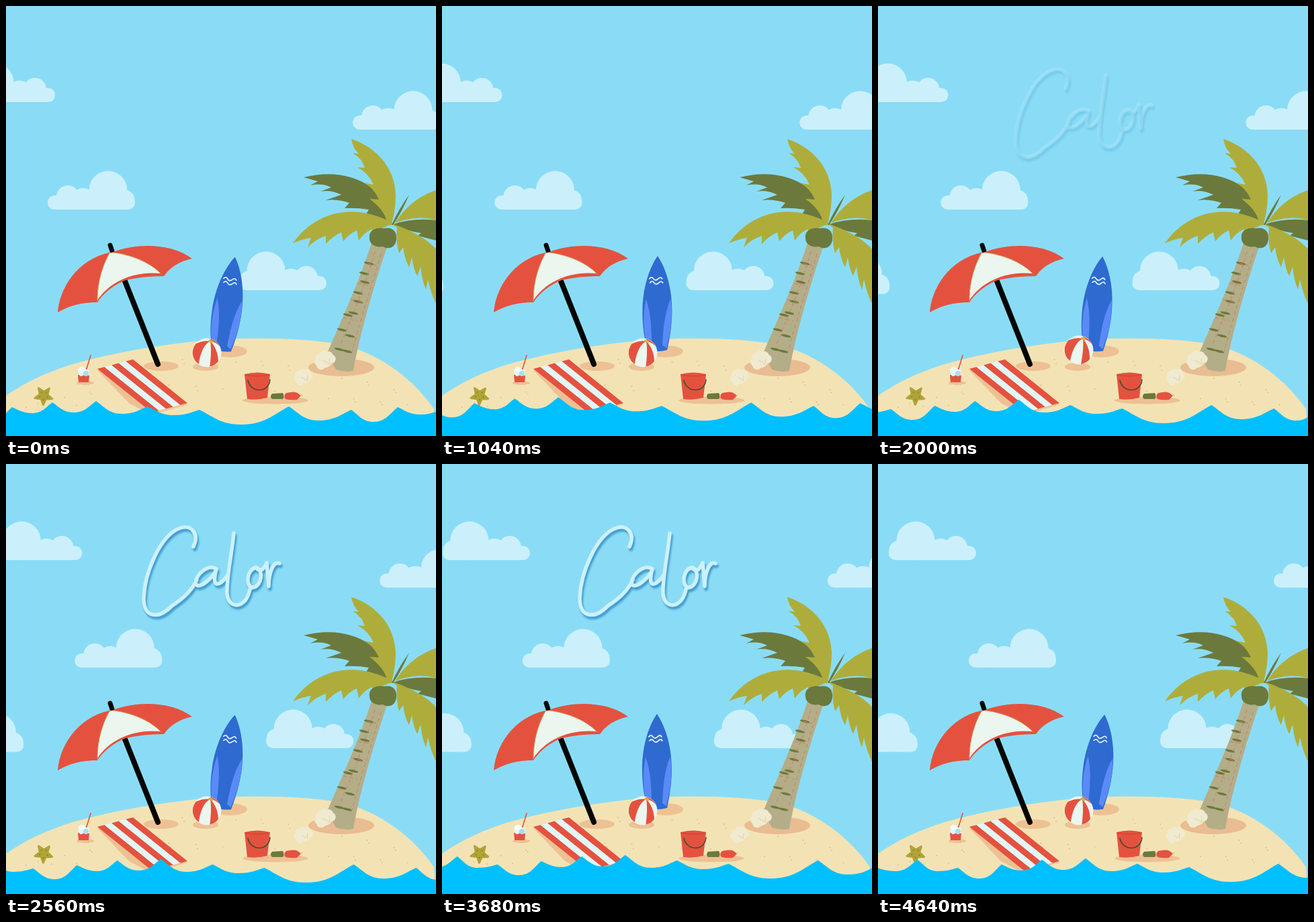
These frames come from a looping animation (640 by 640 pixels, 4.72 s). An HTML page with a canvas:

```html
<!DOCTYPE html>
<html lang="es">
<head>
<meta charset="utf-8">
<title>Calor</title>
<style>
html, body { margin: 0; width: 100%; height: 100%; overflow: hidden; background: #8adcf6; }
canvas { display: block; width: 640px; height: 640px; }
</style>
</head>
<body>
<canvas id="stage" width="640" height="640" role="img" aria-label="Calor"></canvas>
<script>
const ctx = document.getElementById('stage').getContext('2d');
const LOOP = 4720, STEP = 40, SWAY = 2500;
const C = {
  sky: '#8adcf6', cloud: '#cbf0fb', sea: '#00bfff', sand: '#f3e3b4', shade: '#edc194',
  red: '#e4523f', white: '#e2f6f8', cream: '#eaf6ee', leaf: '#aead3b', dark: '#6b7a3c', trunk: '#b3ae88',
  board: '#2f6ad0', stripe: '#5a8af8', shell: '#efead0', black: '#050505'
};

function fill(color, d) {
  ctx.fillStyle = color;
  ctx.fill(new Path2D(d));
}
function line(color, width, d) {
  ctx.strokeStyle = color;
  ctx.lineWidth = width;
  ctx.stroke(new Path2D(d));
}
function oval(color, x, y, rx, ry = rx, turn = 0) {
  ctx.fillStyle = color;
  ctx.beginPath();
  ctx.ellipse(x, y, rx, ry, turn, 0, 7);
  ctx.fill();
}
function at(x, y, turn, draw) {
  ctx.save();
  ctx.translate(x, y);
  ctx.rotate(turn);
  draw();
  ctx.restore();
}
const clamp = v => Math.max(0, Math.min(1, v));

function cloud(x, y, flip) {
  ctx.save();
  ctx.translate(flip ? x + 130 : x, y);
  if (flip) ctx.scale(-1, 1);
  ctx.fillStyle = C.cloud;
  ctx.beginPath();
  ctx.roundRect(0, -21, 130, 21, 10);
  ctx.fill();
  oval(C.cloud, 30, -19, 17);
  oval(C.cloud, 53, -19, 16, 13);
  oval(C.cloud, 90, -29, 28.5);
  oval(C.cloud, 115, -14.5, 14.5);
  ctx.restore();
}

function clouds(t) {
  const x = t * 0.01573;
  cloud(62 + x, 303);
  cloud(516 + x, 184);
  cloud(-144 + x, 428.5);
  cloud(-57 + x, 143, true);
  cloud(347 + x, 423, true);
}

function island() {
  fill(C.sand, 'M0 580C30 559 62 545 96 534C160 515 270 496 350 495C410 494 460 497 500 504C560 518 610 560 637 600L640 640H0Z');
  for (let i = 0; i < 46; i++) {
    const x = 30 + (i * 137.5) % 570;
    const top = 512 + Math.pow(Math.abs(x - 350) / 300, 2) * 75;
    oval('#e9b995', x, top + (i * 0.618 % 1) * (596 - top), 1);
  }
  oval(C.shade, 231, 536, 26, 7);
  oval(C.shade, 333, 514, 26, 9);
  oval(C.shade, 297, 537, 19, 6);
  oval('#e9bc91', 499, 538, 49, 13);
  oval(C.shade, 401, 587, 49, 5.5);
  oval(C.shade, 118, 561, 13, 3);
}

function palm() {
  fill(C.trunk, 'M545 350L568 356C553 400 528 480 517 543Q505 546 491 541L478 517C500 465 526 410 545 350Z');
  const rings = [[540, 383], [533, 398], [534, 411], [524, 427], [524, 440], [509, 460], [517, 457], [500, 482], [512, 491], [496, 511], [508, 514]];
  for (const [x, y] of rings) oval(C.dark, x, y, 7.5, 1.9, 0.24);
  ctx.setLineDash([5, 5]);
  line('#d4776f', 1, 'M549 366C536 412 514 465 497 506M558 369C544 420 526 470 515 515M538 383L551 386M525 413L541 416M514 437L532 442M502 464L523 469');
  ctx.setLineDash([]);

  fill(C.leaf, 'M579 323C594 300 612 284 640 274V319C620 313 600 315 579 323Z');
  fill(C.dark, 'M576 325Q606 315 640 319V349Q625 345 613 342L618 338Q596 335 576 325Z');
  fill(C.leaf, 'M572 323C605 334 634 350 646 370V453Q634 436 628 407L625 422Q619 408 617 388L612 402Q606 390 604 374L600 389Q593 376 591 359L585 368Q580 350 582 330Z');
  fill(C.dark, 'M443 255C482 245 516 251 541 268C557 282 566 302 573 324Q554 313 533 315L540 303Q522 300 504 301L511 293Q494 287 476 289L499 281Q484 273 468 276L484 270Q470 263 453 267L464 261Q454 258 443 255Z');
  fill(C.leaf, 'M514 198C556 212 579 245 580 281Q580 304 573 327L567 322Q564 304 541 287L555 288Q548 271 532 263L547 266Q540 249 523 240L534 241Q530 227 516 219L525 220Q516 211 514 198Z');
  fill(C.leaf, 'M427 353C455 313 510 287 578 324Q560 328 545 342L545 332Q533 337 525 349L522 334Q511 339 502 350L499 337Q487 342 476 354L476 342Q461 347 449 359L454 345Q441 347 427 353Z');
  fill(C.dark, 'M574 326Q584 303 600 281Q589 307 576 326Z');
  fill(C.dark, 'M541 346C539 332 554 329 563 331C575 329 582 335 581 347C580 360 569 363 561 358C549 360 541 354 541 346Z');
}

function surfboard(turn) {
  at(320, 513, turn, () => {
    fill(C.board, 'M0 -141C13 -122 22 -92 22 -59C22 -35 18 -14 15 -1Q0 3 -13 -1C-19 -16 -22 -35 -22 -59C-22 -92 -13 -122 0 -141Z');
    fill(C.stripe, 'M-17 -77C-9 -56 -8 -29 -8 -1L-13 -2C-21 -25 -22 -52 -17 -77Z');
    fill(C.stripe, 'M20 -78C10 -55 9 -28 8 -8L14 -4C20 -28 24 -49 20 -78Z');
    const ripple = 'q3 -4 6 0t7 0t6 0';
    line('#d9f1ff', 1.8, 'M-12 -107' + ripple + 'M-11 -101' + ripple);
  });
}

function ball(t) {
  const phase = (t % (SWAY / 2) - 250) / 540;
  const hop = phase > 0 && phase < 1 ? Math.sin(Math.PI * phase) : 0;
  at(299, 516 - 17.5 * hop, hop * 0.25, () => {
    oval(C.cream, 0, 0, 21.5);
    ctx.save();
    ctx.beginPath();
    ctx.arc(0, 0, 21.2, 0, 7);
    ctx.clip();
    fill(C.red, 'M5 -17C-3 -14 -10 0 -12 17L-24 8V-10L-15 -14Q-5 -19 5 -17Z');
    fill(C.red, 'M5 -17C7 -6 6 8 4 24L17 15Q17 -5 5 -17Z');
    fill(C.red, 'M5 -17Q16 -16 24 -3V-20H5Z');
    ctx.restore();
    oval('#d5b448', 6, -17, 4, 2, 0.4);
  });
}

function umbrella() {
  line(C.black, 8, 'M176 407L226 533');
  line(C.black, 7, 'M155 356L158 365');
  fill(C.red, 'M160 366C198 352 247 354 277 376Q249 382 235 402Q204 402 178 408Q151 419 136 441Q102 441 77 456C81 410 116 372 160 366Z');
  fill(C.cream, 'M160 367C190 371 216 383 230 398C188 394 154 411 136 438C136 408 145 384 154 368Z');
  line('#cf9f4b', 0.8, 'M154 368C145 384 136 408 136 439M160 367C190 371 216 383 231 399');
}

function towel() {
  const stripe = (a, b, color) => {
    const x = k => 136 + 53 * k, y = k => 540 - 14 * k;
    fill(color, `M${x(a)} ${y(a)}L${x(b)} ${y(b)}l81 65L${x(a) + 81} ${y(a) + 65}Z`);
  };
  fill(C.shade, 'M136 542L189 528L270 593L216 609L183 591Z');
  for (let i = 0; i < 5; i++) stripe(i / 5, (i + 1) / 5, i % 2 ? C.white : C.red);
}

function drink() {
  line(C.red, 1.6, 'M119 543L126 520');
  fill(C.white, 'M107 541H124L123 560H108Z');
  fill(C.red, 'M107 549L124 550L123 560H108Z');
  oval('#f4fdff', 113, 541, 5, 4);
  oval('#a9dff0', 119, 547, 4, 4);
  oval(C.white, 112, 548, 3, 3);
}

function bucket() {
  fill(C.red, 'M355 548Q374 543 393 548L389 583Q374 587 359 585Z');
  line('#c9412f', 1, 'M356 549Q374 553 392 549');
  line('#405030', 1.6, 'M360 557C364 576 391 577 393 556');
  fill(C.dark, 'M396 577L412 576Q415 581 412 585H396Q392 581 396 577Z');
  fill(C.red, 'M417 576Q430 573 434 576L439 580L433 586Q423 587 416 585Q412 580 417 576Z');
}

function shell(x, y, size) {
  at(x, y, -0.25, () => {
    for (let i = 0; i < 6; i++) {
      const a = 2.5 + i * 0.75;
      oval(C.shell, Math.cos(a) * size * 0.58, Math.sin(a) * size * 0.5, size * 0.43);
    }
    oval(C.shell, 0, 0, size * 0.65);
    line('#e4d3a6', 1, `M${size * 0.3} ${size * 0.4}L${-size * 0.2} ${-size * 0.1}M${size * 0.3} ${size * 0.4}L${size * 0.45} ${-size * 0.1}`);
  });
}

function starfish() {
  const tilt = -0.9;
  ctx.fillStyle = ctx.strokeStyle = '#b0a337';
  ctx.lineWidth = 3;
  ctx.beginPath();
  for (let i = 0; i < 10; i++) {
    const a = i * Math.PI / 5 + tilt, r = i % 2 ? 6 : 13.5;
    ctx.lineTo(56 + r * Math.cos(a), 580 + r * Math.sin(a));
  }
  ctx.closePath();
  ctx.fill();
  ctx.stroke();
  for (let i = 0; i < 5; i++) {
    const a = i * Math.PI * 0.4 + tilt;
    oval('#857d2c', 56 + 6 * Math.cos(a), 580 + 6 * Math.sin(a), 1);
  }
}

// Crest x, y, followed by the trough to its right.
const swells = [
  [-182, 597, -149, 604], [-116, 587, -86, 604], [-56, 599, -24, 615], [9, 594, 39, 603],
  [69, 587, 101, 602], [134, 585, 172, 604], [211, 593, 250, 606], [288, 598, 350, 620],
  [421, 593, 465, 614], [514, 598, 547, 616], [583, 594, 617, 605], [650, 597, 685, 605]
];

function sea(t, bob) {
  ctx.save();
  ctx.translate(t * 0.0377, bob * 3);
  ctx.fillStyle = C.sea;
  ctx.beginPath();
  ctx.moveTo(-182, 660);
  swells.forEach(([x, y, tx, ty], i) => {
    ctx.lineTo(x, y);
    const dx = tx - x, dy = ty - y;
    ctx.bezierCurveTo(x + dx * 0.3, y + dy * 0.4, tx - dx * 0.5, ty, tx, ty);
    const next = swells[i + 1];
    if (!next) return;
    const ex = next[0] - tx, ey = ty - next[1];
    ctx.bezierCurveTo(tx + ex * 0.5, ty, next[0] - ex * 0.3, next[1] + ey * 0.4, next[0], next[1]);
  });
  ctx.lineTo(700, 660);
  ctx.fill();
  ctx.restore();
}

const word = [
  'M279 123C288 104 276 90 260 95C229 105 206 164 205 200C205 230 228 231 247 211C266 199 278 186 284 172',
  'M313 156C300 148 282 165 282 178C286 188 307 171 313 157C309 171 309 183 319 177Q327 171 331 163',
  'M339 103C336 135 328 170 329 193C331 211 345 215 356 203Q361 197 364 183',
  'M372 154C358 157 356 182 367 184C381 182 384 157 372 154Q380 165 388 147L391 182C391 163 398 143 407 148'
].join('');

function title(t) {
  const alpha = clamp((t - 1900) / 400) * clamp((4540 - t) / 280);
  if (!alpha) return;
  ctx.save();
  ctx.globalAlpha = alpha;
  ctx.lineCap = ctx.lineJoin = 'round';
  ctx.shadowColor = 'rgba(25, 120, 185, .65)';
  ctx.shadowBlur = 3;
  ctx.shadowOffsetX = 2;
  ctx.shadowOffsetY = 4;
  line('#cdf1fb', 5.5, word);
  ctx.restore();
}

function draw(t) {
  const sway = Math.cos(2 * Math.PI * t / SWAY + 0.05);
  ctx.fillStyle = C.sky;
  ctx.fillRect(0, 0, 640, 640);
  ctx.lineCap = ctx.lineJoin = 'round';
  clouds(t);
  title(t);
  island();
  palm();
  surfboard((4.2 + 4.3 * sway) * Math.PI / 180);
  ball(t);
  umbrella();
  towel();
  drink();
  bucket();
  shell(475, 528, 16);
  shell(443, 553, 14);
  starfish();
  sea(t, sway);
}

const start = performance.now();
function tick() {
  const t = (performance.now() - start) % LOOP;
  draw(Math.min(Math.floor(t / STEP) * STEP, LOOP - 2 * STEP));
  requestAnimationFrame(tick);
}
tick();
</script>
</body>
</html>
```
